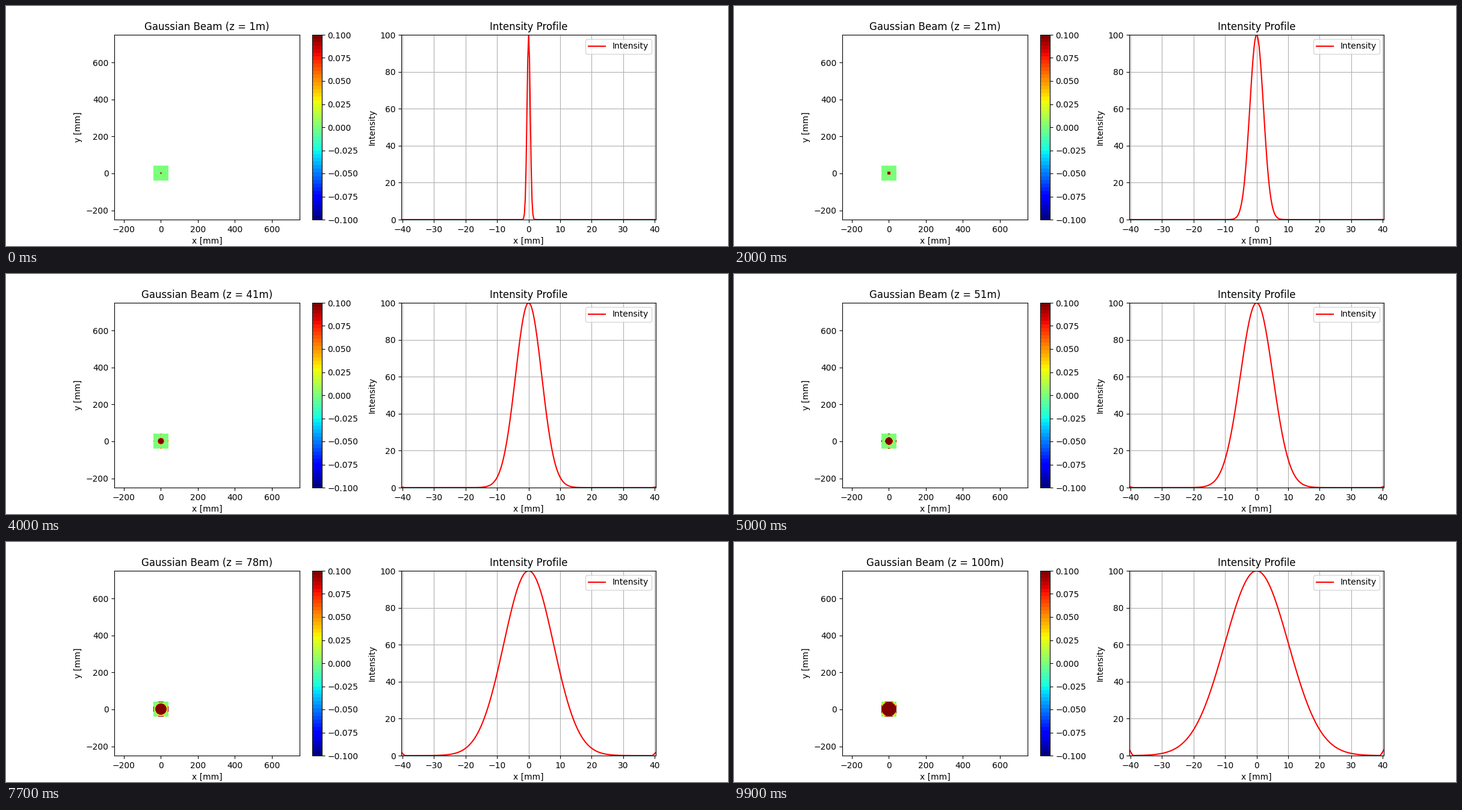
A matplotlib script for the animation above (10000 ms loop, 1200 px wide and 400 px high).

```python
import numpy as np
import matplotlib.pyplot as plt
from matplotlib.animation import FuncAnimation

FRAMES = 100
WAIST = 1.0                              # mm
RAYLEIGH = np.pi * 1e-6 / 632.8e-9       # m


def beam_width(z):
    return WAIST * np.hypot(1, z / RAYLEIGH)


HALF = 2 * beam_width(FRAMES)            # half the grid size, mm
x = np.linspace(-HALF, HALF, 301)
edge = np.clip((np.abs(x) - HALF + 1.1) / 1.1, 0, 1)


def profile(z):
    """Relative intensity along one axis, with the grid-edge artefact."""
    lift = 0.03 * (z / FRAMES) ** 2.5
    return np.exp(-2 * (x / beam_width(z)) ** 2) + lift * edge


fig, (ax_map, ax_cut) = plt.subplots(1, 2, figsize=(12, 4), dpi=100)

image = ax_map.imshow(np.zeros((x.size, x.size)), cmap=plt.get_cmap("jet", 51),
                      vmin=-0.1, vmax=0.1, extent=[-HALF, HALF, -HALF, HALF])
fig.colorbar(image, ax=ax_map)
ax_map.set(xlim=(-250, 750), ylim=(-250, 750), xlabel="x [mm]", ylabel="y [mm]")
title = ax_map.set_title("")

line, = ax_cut.plot([], [], "r", label="Intensity")
ax_cut.set(xlim=(-HALF, HALF), ylim=(0, 100), xlabel="x [mm]",
           ylabel="Intensity", title="Intensity Profile")
ax_cut.grid(True)
ax_cut.legend(loc="upper right")


def update(i):
    z = i + 1
    cut = profile(z)
    image.set_data(100 * np.outer(cut, cut))
    line.set_data(x, 100 * cut)
    title.set_text(f"Gaussian Beam (z = {z}m)")
    return image, line, title


anim = FuncAnimation(fig, update, frames=FRAMES, interval=100,
                     repeat=True, repeat_delay=0, blit=False)
plt.show()
```
